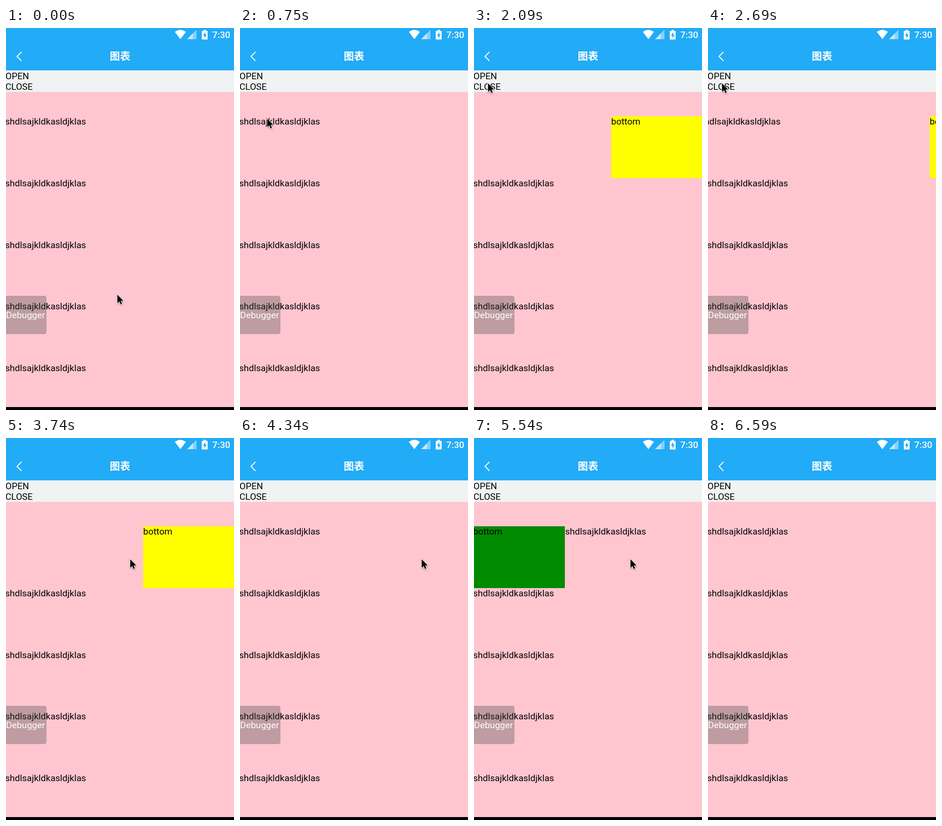
An HTML page for the animation above (7770 ms loop, 389 by 649 pixels).

```html
<!DOCTYPE html>
<html lang="zh">
<head>
<meta charset="utf-8">
<title>图表</title>
<style>
html, body { margin: 0; width: 100%; height: 100%; overflow: hidden; background: #ffc6d0; }
svg { display: block; width: 389px; height: 649px; font: 15.5px Roboto, sans-serif; }
.title { font: 700 17.5px "Noto Sans CJK SC", "Noto Sans CJK", sans-serif; }
</style>
</head>
<body>
<svg viewBox="0 0 389 649">
  <rect width="389" height="649" fill="#ffc6d0"/>

  <g id="rows"></g>
  <g id="swipe">
    <rect x="-159" y="150" width="157" height="105" fill="#008a00"/>
    <text x="-158.5" y="164">bottom</text>
    <text x="-1.5" y="164">shdlsajkldkasldjklas</text>
    <rect x="391" y="150" width="157" height="105" fill="#ff0"/>
    <text x="391" y="164">bottom</text>
  </g>

  <rect width="389" height="72" fill="#22abf6"/>
  <rect y="72" width="389" height="36.5" fill="#f0f3f4"/>
  <text x="-1" y="87">OPEN</text>
  <text x="-1" y="105">CLOSE</text>

  <g fill="#fff">
    <path d="M297.5 19 L288 6.5 Q297.5 -.5 307 6.5 Z"/>
    <path d="M325 3 V19 H309 Z" opacity=".45"/>
    <path d="M319 9 V19 H309 Z" opacity=".5"/>
    <path d="M337 3 h4 v2 h3 v14.5 h-10 v-14.5 h3 Z"/>
    <path d="M340 7 l-4 6 h2.5 v4.5 l4 -6 h-2.5 Z" fill="#22abf6"/>
    <text x="352" y="17" font-weight="500">7:30</text>
    <text class="title" x="194.5" y="54" text-anchor="middle">图表</text>
    <path d="M26.5 40.5 L18.8 48.2 L26.5 56" fill="none" stroke="#fff" stroke-width="1.7"/>
  </g>

  <rect x="-6" y="455" width="75" height="65" rx="4" fill="#3c4641" fill-opacity=".33"/>
  <text x="0" y="493" fill="#fff">Debugger</text>
  <rect y="644" width="389" height="5"/>

  <path id="cursor" d="M0 0 V14.5 L3.4 11.4 L5.7 16.6 L8 15.6 L5.8 10.6 H10.3 Z"
        stroke="#fff" stroke-width="1.4" paint-order="stroke"
        style="filter: drop-shadow(0 1px 1px #0006)"/>
</svg>
<script>
const LOOP = 7770, STEP = 150, LAST = 44, PANEL = 157;
const $ = id => document.getElementById(id);

const progress = (t, start, length) => Math.min(1, Math.max(0, (t - start) / length));
const easeOut = p => 1 - (1 - p) ** 2;
const smooth = p => p * p * (3 - 2 * p);

// Times are in screen steps. The row opens and closes by button, then by drag each way.
function rowOffset(t) {
  const slide = (start, length = 2.8) => easeOut(progress(t, start, length));
  const right = slide(16) - slide(8.15);
  const dragged = slide(26) - slide(22);
  const left = slide(33, 4) - slide(38);
  return PANEL * (right + dragged + left);
}

function cursorAt(t) {
  let x = 190, y = 453;
  const move = (start, length, toX, toY) => {
    const p = smooth(progress(t, start, length));
    x += (toX - x) * p;
    y += (toY - y) * p;
  };
  move(0, 7, 11, 80);      // to OPEN
  move(11, 2, 24, 94);     // to CLOSE
  move(18, 4, 300, 206);   // to the row
  move(22, 3, 212, 206);   // drag left
  move(26, 3, 310, 206);   // drag back
  move(29, 4, 128, 207);
  move(33, 4, 267, 206);   // drag right
  move(38, 3, 120, 206);   // drag back
  move(41, 2, 289, 494);   // leave
  return [x, y];
}

// The screen refreshes in steps, 10 ms early from the tenth on.
function stepAt(t) {
  const early = t < 10 * STEP - 10 ? 0 : 10;
  return Math.min(Math.floor((t + early) / STEP), LAST);
}

for (let i = 1; i < 5; i++) {
  $("rows").innerHTML += `<text x="-1.5" y="${164 + i * 104.75}">shdlsajkldkasldjklas</text>`;
}

function draw(now) {
  const step = stepAt(now % LOOP);
  const [x, y] = cursorAt(step);
  $("cursor").setAttribute("transform", `translate(${x} ${y})`);
  $("cursor").setAttribute("visibility", step < LAST ? "visible" : "hidden");
  $("swipe").setAttribute("transform", `translate(${rowOffset(step)} 0)`);
}

const start = performance.now();
function tick() {
  draw(performance.now() - start);
  requestAnimationFrame(tick);
}
tick();
</script>
</body>
</html>
```
